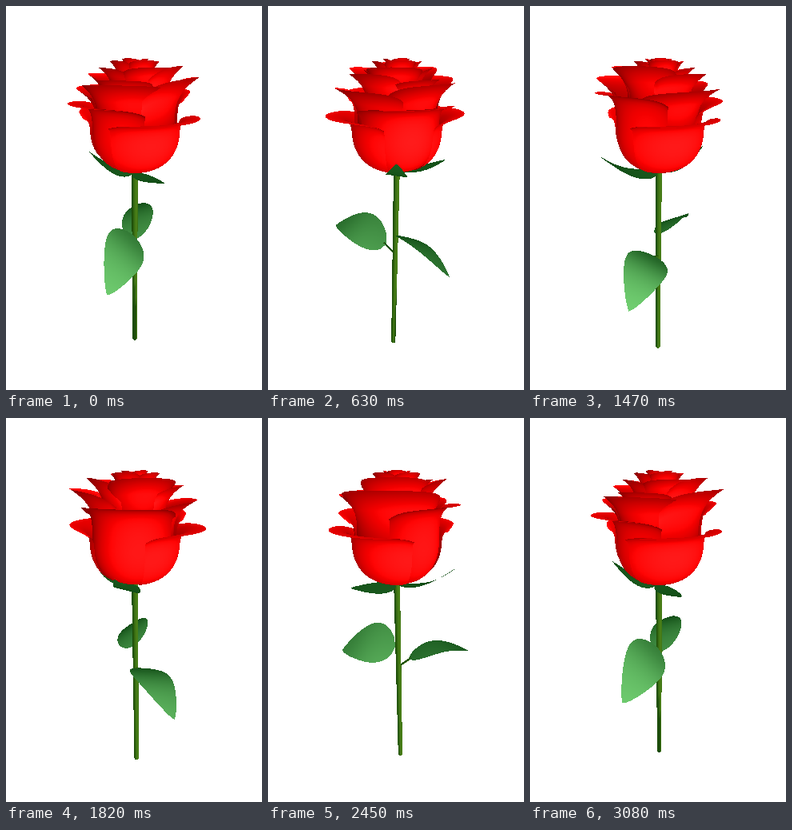
Write an HTML page with a canvas that moves like this. It is 320x480 px and loops after 3.15 s.

```html
<!DOCTYPE html>
<html lang="en">
<head>
<meta charset="utf-8">
<title>Turning rose</title>
<style>
html, body { margin: 0; width: 100%; height: 100%; overflow: hidden; background: #fff; }
canvas { display: block; width: 320px; height: 480px; }
</style>
</head>
<body>
<canvas id="stage" width="320" height="480"></canvas>
<script>
const W = 320, H = 480, STEP = 70, STEPS = 45;
const CX = 161, HORIZON = 80, DIST = 310;
const LIGHT = [0.3, -0.15, 0.94];
const RAD = Math.PI / 180;
const ctx = document.getElementById('stage').getContext('2d');
const image = ctx.createImageData(W, H);
const pixels = new Uint32Array(image.data.buffer);
const depth = new Float32Array(W * H);
const meshes = [];

const clamp = (v, a = 0, b = 1) => Math.min(b, Math.max(a, v));
const mix = (a, b, t) => a + (b - a) * t;

// Palettes of 256 shades, packed as ABGR.
function palette(fn) {
  return Uint32Array.from({ length: 256 }, (_, i) => {
    const [r, g, b] = fn(i / 255).map(c => Math.round(clamp(c, 0, 255)));
    return (255 << 24 | b << 16 | g << 8 | r) >>> 0;
  });
}
const RED = palette(k => [60 + 270 * k, 130 * (k - 0.68), 130 * (k - 0.68)]);
const LEAF = palette(k => [mix(5, 112, k), mix(60, 205, k), mix(10, 112, k)]);
const STEM = palette(k => [mix(18, 85, k), mix(65, 140, k), mix(5, 28, k)]);

// Samples a surface fn(u, v) -> [x, y, z], u in -1..1, v in 0..1.
// ao(u, v) gives the brightness of the outer and the inner face.
function addMesh(nu, nv, fn, kind, ao = () => [1, 1]) {
  const verts = [], e = 0.01;
  for (let j = 0; j <= nv; j++) {
    for (let i = 0; i <= nu; i++) {
      const u = i / nu * 2 - 1, v = j / nv, c = clamp(v, 0.03, 0.97);
      const p = fn(u, v);
      const a = fn(u + e, c), b = fn(u - e, c), d = fn(u, c + e), f = fn(u, c - e);
      const s = a.map((x, k) => x - b[k]), t = d.map((x, k) => x - f[k]);
      let n = [s[1] * t[2] - s[2] * t[1], s[2] * t[0] - s[0] * t[2], s[0] * t[1] - s[1] * t[0]];
      const flip = n[0] * p[0] + n[2] * p[2] < 0 ? -1 : 1;
      const len = Math.hypot(...n) * flip || 1;
      n = n.map(x => x / len);
      verts.push({ p, n, ao: ao(u, v) });
    }
  }
  meshes.push({ nu, nv, verts, kind });
}

const polar = (r, az, y) => [r * Math.sin(az), y, r * Math.cos(az)];

function bulb(y, r) {
  const c = clamp((y - 75) / 46);
  return r * Math.pow(1 - c * c, 0.36);
}

// A petal stands on a wall and bends outward to a rim; outer lips end level.
function petal(az, half, wall, reach, top, base, drop, power, cover = 0) {
  const outer = base > 100;
  addMesh(28, 24, (u, v) => {
    const q = Math.pow(v, outer ? 1.4 : 1);
    const rim = top + drop * u * u * (0.3 + 0.7 * u ** 4);
    const lift = outer ? (base - rim) / (power - 1) : 0;
    const y = base - (base - rim + lift) * q + lift * Math.pow(q, power);
    const flare = 0.25 + 0.75 * Math.max(0, 1 - Math.abs(u) ** (outer ? 2 : 4));
    const r = bulb(y, wall) + (reach - wall) * flare * Math.pow(q, power);
    return polar(r, (az + u * half) * RAD, y);
  }, 'petal', (u, v) => {
    const low = outer ? 0.92 + 0.08 * v : 0.6 + 0.4 * Math.min(1, v * 1.6);
    const side = 1 - cover * u * u;
    return [low * side * (1 - 0.3 * v ** 5), 0.5 + 0.5 * v ** 4];
  });
}

function leaf(az, r0, r1, y0, y1, half, roll, arch, kind) {
  const a = az * RAD, sn = Math.sin(a), cs = Math.cos(a);
  addMesh(10, 24, (u, v) => {
    const w = u * half * Math.pow(Math.max(0, Math.sin(Math.PI * Math.pow(v, 0.72))), 0.78);
    const r = mix(r0, r1, v), side = w * Math.cos(roll * RAD);
    const y = mix(y0, y1, v) - arch * Math.sin(Math.PI * v) + w * Math.sin(roll * RAD);
    return [r * sn + side * cs, y, r * cs - side * sn];
  }, kind);
}

function sepal(az, reach, tip) {
  leaf(az, 3, reach, 127, tip, 13, 8, (tip - 127) / 4, 'sepal');
}

function tube(from, to, r0, r1, flat) {
  addMesh(12, 20, (u, v) => {
    const a = u * Math.PI, r = mix(r0, r1, v);
    const c = from.map((x, i) => mix(x, to[i], v));
    return flat
      ? [c[0] + r * Math.sin(a), c[1] + r * Math.cos(a), c[2]]
      : [c[0] + r * Math.sin(a), c[1], c[2] + r * Math.cos(a)];
  }, 'stem');
}

function build() {
  // outer cup
  petal(35, 62, 55, 86, 53, 121, 8, 8);
  petal(-141, 56, 55, 86, 53, 121, 8, 8);
  petal(-54, 65, 52, 83, 38, 121, 10, 8, 0.25);
  petal(137, 65, 52, 79, 26, 121, 12, 7, 0.25);
  // middle ring
  petal(70, 62, 49.5, 79, 8, 66, 18, 3);
  petal(-20, 62, 47, 71, 15, 66, 12, 3, 0.3);
  petal(-127, 62, 48, 76, 21, 66, 12, 3, 0.2);
  // upper ring
  petal(75, 55, 38, 60, -5, 42, 16, 2.6);
  petal(165, 55, 37, 62, -4, 42, 16, 2.6, 0.25);
  petal(-120, 55, 38, 60, 4, 42, 10, 2.6);
  petal(-25, 55, 36, 54, 11, 42, 8, 2.6, 0.25);
  // heart
  for (const az of [40, 160, 280]) petal(az, 68, 29, 45, -3, 24, 9, 2.2, 0.3);
  for (const az of [30, 120, 210, 300]) petal(az, 54, 19, 31, -11, 16, 8, 2, 0.3);
  for (const az of [80, 200, 320]) petal(az, 66, 9, 17, -14, 6, 5, 2, 0.3);

  sepal(28, 64, 116);
  sepal(-72, 57, 96);
  sepal(138, 78, 92);

  leaf(-22, 2, 73, 206, 220, 24, 31, 9, 'leaf');
  leaf(-185, 15, 92, 222, 216, 23, 17, 11, 'leaf');
  tube([0, 232, 0], polar(18, -185 * RAD, 221), 1.3, 1.1, true);
  tube([0, 122, 0], [0, 340, -4.5], 4, 2.7, false);
}

function shade(kind, n, p, ao) {
  const view = [-p[0], -p[1], DIST - p[2]];
  const facing = (n[0] * view[0] + n[1] * view[1] + n[2] * view[2]) / Math.hypot(...view);
  const inner = facing < 0, side = inner ? -1 : 1;
  const lit = Math.max(0, side * (n[0] * LIGHT[0] + n[1] * LIGHT[1] + n[2] * LIGHT[2]));
  if (kind === 'petal') return inner ? (0.6 + 0.35 * lit) * ao[1] : (0.4 + 0.55 * lit) * ao[0];
  if (kind === 'stem') return 0.15 + 0.75 * clamp(n[0] * 0.6 + n[2] * 0.7);
  const green = Math.abs(facing) * (0.64 + 0.004 * p[2]);
  return kind === 'sepal' ? 0.1 + 0.3 * green : 0.1 + green;
}

function triangle(a, b, c, colors) {
  const area = (b.x - a.x) * (c.y - a.y) - (b.y - a.y) * (c.x - a.x);
  if (Math.abs(area) < 1e-6) return;
  const x0 = Math.max(0, Math.ceil(Math.min(a.x, b.x, c.x) - 0.5));
  const x1 = Math.min(W - 1, Math.floor(Math.max(a.x, b.x, c.x) - 0.5));
  const y0 = Math.max(0, Math.ceil(Math.min(a.y, b.y, c.y) - 0.5));
  const y1 = Math.min(H - 1, Math.floor(Math.max(a.y, b.y, c.y) - 0.5));
  for (let y = y0; y <= y1; y++) {
    for (let x = x0; x <= x1; x++) {
      const px = x + 0.5, py = y + 0.5;
      const wb = ((px - a.x) * (c.y - a.y) - (py - a.y) * (c.x - a.x)) / area;
      const wc = ((b.x - a.x) * (py - a.y) - (b.y - a.y) * (px - a.x)) / area;
      const wa = 1 - wb - wc;
      if (wa < -1e-6 || wb < -1e-6 || wc < -1e-6) continue;
      const s = wa * a.s + wb * b.s + wc * c.s, at = y * W + x;
      if (s <= depth[at]) continue;
      depth[at] = s;
      pixels[at] = colors[Math.round(255 * clamp(wa * a.k + wb * b.k + wc * c.k))];
    }
  }
}

function render(angle) {
  pixels.fill(0xffffffff);
  depth.fill(0);
  const sn = Math.sin(angle), cs = Math.cos(angle);
  const turn = ([x, y, z]) => [x * cs + z * sn, y, z * cs - x * sn];
  for (const { nu, nv, verts, kind } of meshes) {
    const colors = kind === 'petal' ? RED : kind === 'stem' ? STEM : LEAF;
    const pts = verts.map(({ p, n, ao }) => {
      const q = turn(p), s = DIST / (DIST - q[2]);
      // The stem is lit in its own frame-independent cross-section.
      return { x: CX + q[0] * s, y: HORIZON + q[1] * s, s, k: shade(kind, turn(n), q, ao) };
    });
    for (let j = 0; j < nv; j++) {
      for (let i = 0; i < nu; i++) {
        const o = j * (nu + 1) + i, up = o + nu + 1;
        triangle(pts[o], pts[o + 1], pts[up], colors);
        triangle(pts[o + 1], pts[up + 1], pts[up], colors);
      }
    }
  }
  ctx.putImageData(image, 0, 0);
}

let shown = -1;
const start = performance.now();
function tick() {
  const step = Math.floor(Math.max(0, performance.now() - start) / STEP) % STEPS;
  if (step !== shown) {
    shown = step;
    render(step / STEPS * 2 * Math.PI);
  }
  requestAnimationFrame(tick);
}

build();
tick();
</script>
</body>
</html>
```
